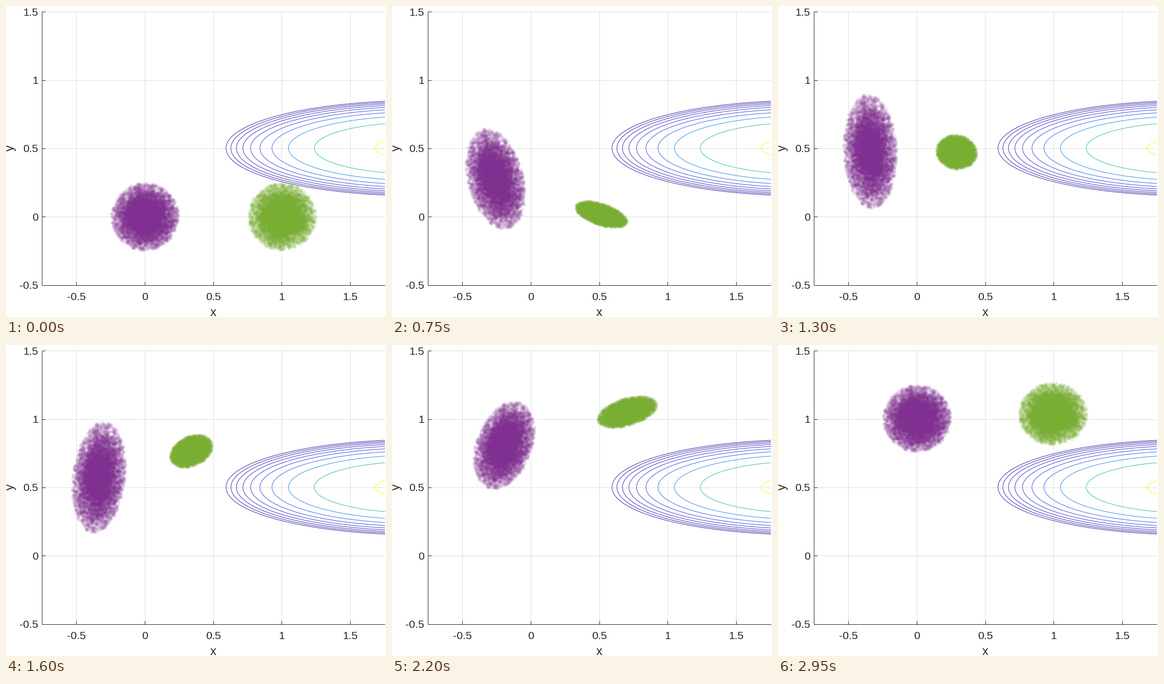
Write a matplotlib script that moves like this. It is 742 by 607 pixels and loops after 3000 ms.

```python
import numpy as np
import matplotlib.pyplot as plt
from matplotlib.animation import FuncAnimation
from matplotlib.colors import LinearSegmentedColormap

W, H, DPI = 742, 607, 100
PX = 72 / DPI              # one pixel in points
FRAMES, STEP = 60, 50
LEFT, RIGHT, BOTTOM = 70.3, 740, 544.8
UNIT_X, UNIT_Y = 267.4, 266.8
INK = "#262626"
DOT = 3.5                  # dot radius in pixels
N_DOTS = 7000

plt.rcParams["font.family"] = "Liberation Sans"
fig = plt.figure(figsize=(W / DPI, H / DPI), dpi=DPI, facecolor="white")
ax = fig.add_axes([0, 0, 1, 1])
ax.set(xlim=(0, W), ylim=(H, 0))
ax.axis("off")


def to_px(x, y):
    return LEFT + (x + 0.75) * UNIT_X, BOTTOM - (y + 0.5) * UNIT_Y


def line(x, y, color, z, alpha=1):
    ax.plot(x, y, color=color, lw=PX, alpha=alpha, zorder=z,
            solid_capstyle="butt")


def label(x, y, text, size, ha="center", rotation=0):
    ax.text(x, y, text, fontsize=size * PX, color=INK, ha=ha, va="baseline",
            rotation=rotation, rotation_mode="anchor")


# Axes, grid and labels
TOP = to_px(0, 1.5)[1]
for v in np.arange(-0.5, 2, 0.5):
    x, y = to_px(v, v)
    line([x, x], [TOP, BOTTOM], INK, 1, 0.15)
    line([x, x], [BOTTOM, BOTTOM - 7], INK, 5)
    label(x, 574.5, f"{v:g}", 21.33)
    line([LEFT, RIGHT], [y, y], INK, 1, 0.15)
    line([LEFT, LEFT + 7], [y, y], INK, 5)
    label(63, y + 7.5, f"{v:g}", 21.33, ha="right")
line([LEFT, LEFT], [TOP, BOTTOM], INK, 5)
line([LEFT, RIGHT], [BOTTOM, BOTTOM], INK, 5)
label(405, 605, "x", 23.47)
label(15, 277.5, "y", 23.47, rotation=90)

# Contours of exp(-r^2) around (2, 0.5), evenly spaced in its reciprocal
CX, CY = to_px(2, 0.5)
CX, CY = CX + 0.5, CY - 0.5
cmap = LinearSegmentedColormap.from_list("sea", [
    (0, "#3e26a8"), (0.25, "#4367fd"), (0.36, "#2a93ec"),
    (0.55, "#2fc0a0"), (1, "#f9fb15")])
levels = 1 / (1.108 + 0.684 * np.arange(10))
for level, tone in zip(levels, (levels - levels[-1]) / np.ptp(levels)):
    a = UNIT_X * np.sqrt(-np.log(level))
    end = np.arccos((CX - RIGHT) / a)
    th = np.linspace(-end, end, 200)
    line(CX - a * np.cos(th), CY + 0.247 * a * np.sin(th), cmap(tone), 2)


def path(u, start, end, *amps):
    """Straight run from start to end plus a short sine series."""
    return start + (end - start) * u + sum(
        a * np.sin(n * np.pi * u) for n, a in enumerate(amps, 1))


# Cloud poses over the loop: centre, half width, half height, correlation
def purple_pose(u):
    return (path(u, 271, 271, -88.5, -8.5, 3.6, -2.5),
            path(u, 411, 143, -11.5, 5.3, -3.5, 4),
            path(u, 68, 68.5, -12, -0.5, 2),
            path(u, 68, 67, 40.7, 6, -4.3),
            path(u, 0, 0, -0.04, 0.31, 0.03, -0.05))


def green_pose(u):
    return (path(u, 539, 536.5, -165, -26, 21),
            path(u, 411, 134.5, -20, 70, 15, -4),
            path(u, 68, 68.5, -21.5, -3.75, 5),
            path(u, 68, 62.5, -39.6, -4, -9.6, -3),
            path(u, 0, 0, -0.05, 0.5, 0.12, -0.05))


def place(pts, cx, cy, hx, hy, rho):
    """Map the unit disc to an ellipse by the symmetric root of its shape."""
    hx, hy = hx - DOT + 1, hy - DOT + 1
    c = rho * hx * hy
    root = hx * hy * np.sqrt(1 - rho * rho)
    m = np.array([[hx * hx + root, c], [c, hy * hy + root]])
    m /= np.sqrt(hx * hx + hy * hy + 2 * root)
    return pts @ m + (cx, cy)


def disc(rng):
    """Normal points cut off at the unit circle."""
    p = rng.normal(0, 0.44, (2 * N_DOTS, 2))
    return p[np.hypot(p[:, 0], p[:, 1]) < 1][:N_DOTS]


def cloud(color):
    return ax.plot([], [], "o", color=color, ms=2 * DOT * PX, mew=0,
                   alpha=0.13, zorder=3)[0]


rng = np.random.default_rng(4)
clouds = [(cloud("#803090"), disc(rng), purple_pose),
          (cloud("#79ae33"), disc(rng), green_pose)]


def draw(k):
    u = k / (FRAMES - 1)
    for dots, pts, pose in clouds:
        dots.set_data(*place(pts, *pose(u)).T)
    return [c[0] for c in clouds]


anim = FuncAnimation(fig, draw, frames=FRAMES, interval=STEP, repeat=True)
plt.show()
```
